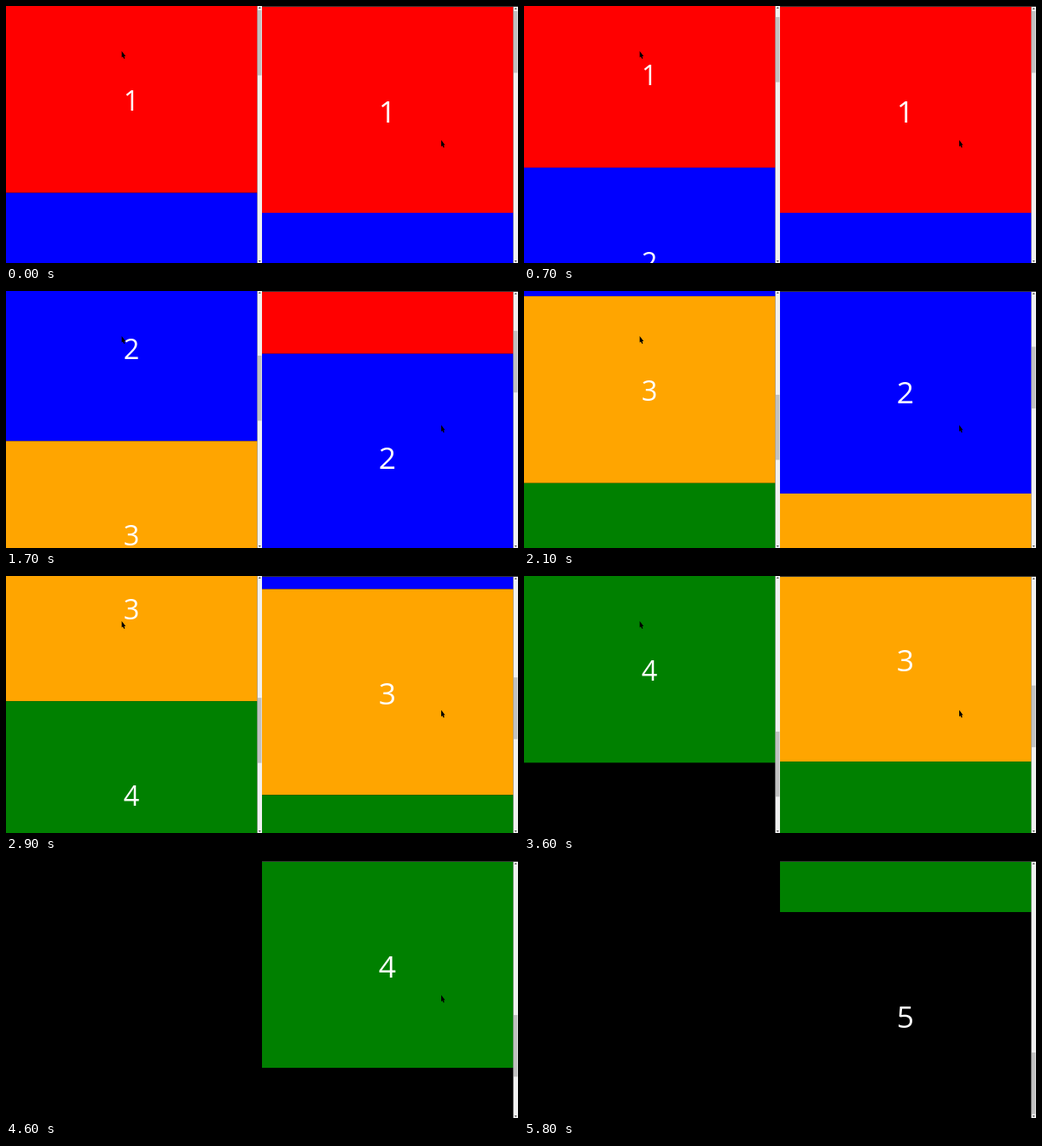
Write an HTML page that moves like this. It is 600 px wide and 302 px high and loops after 6.1 s.

```html
<!DOCTYPE html>
<html lang="en">
<head>
<meta charset="utf-8">
<title>Scroll snapping</title>
<style>
  html, body { margin: 0; width: 100%; height: 100%; overflow: hidden; background: #000; }
  svg { display: block; width: 600px; height: 302px; }
  text { font-family: "Open Sans", "Noto Sans", sans-serif; fill: #fff; text-anchor: middle; }
</style>
</head>
<body>
<svg id="stage" viewBox="0 0 600 302"></svg>
<script>
const LOOP = 6100, STEP = 100, LEFT_END = 4600;
const COLORS = ['#f00', '#00f', '#ffa500', '#008000', '#000'];
const stage = document.getElementById('stage');

function add(parent, tag, attrs, text) {
  const el = document.createElementNS('http://www.w3.org/2000/svg', tag);
  for (const key in attrs) el.setAttribute(key, attrs[key]);
  if (text) el.textContent = text;
  return parent.appendChild(el);
}

const rect = (parent, x, y, width, height, fill) =>
  add(parent, 'rect', { x, y, width, height, fill });

// A scrolling page with five numbered sections and its scrollbar.
function makePanel(o) {
  const root = add(stage, 'g', {});
  const view = add(root, 'svg', { x: o.x, y: o.top, width: 294.5, height: 302 - o.top });
  const page = add(view, 'g', {});
  COLORS.forEach((color, i) => {
    rect(page, 0, i * o.h, 295, o.h + (i === 4 ? 4 : 0), color);
    add(page, 'text', { x: 147, y: i * o.h + o.base, 'font-size': o.size }, String(i + 1));
  });
  const bar = o.x + 294.5;
  rect(root, bar, o.top, 5.5, 302 - o.top, '#f1f1f1');
  const thumb = rect(root, bar + 0.5, 0, 4.5, o.thumb, '#c1c1c1');
  const mid = bar + 2.8;
  add(root, 'path', {
    d: `M${mid - 1.5} ${o.top + 3}h3l-1.5-2zM${mid - 1.5} 299h3l-1.5 2z`, fill: '#555'
  });
  add(root, 'path', {
    transform: `translate(${o.cursor})`, d: 'M0 0V7.6L1.4 6.4 2.6 9 3.8 8.4 2.8 6H4.6Z', fill: '#000'
  });
  return {
    root,
    scroll(y) {
      page.setAttribute('transform', `translate(0 ${-y})`);
      thumb.setAttribute('y', o.thumbTop + y * o.ratio);
    }
  };
}

const LH = 219.6, RH = 242;
const left = makePanel({
  x: 0, top: 0, h: LH, base: 123, size: 32.5,
  thumb: 76.5, thumbTop: 5, ratio: 0.27, cursor: '135.6 53'
});
const right = makePanel({
  x: 300, top: 1, h: RH, base: 135.5, size: 35.5,
  thumb: 72.5, thumbTop: 6, ratio: 0.241, cursor: '510 157.6'
});
rect(stage, 300, 0, 300, 1, '#333');

function glide(t, start, length) {
  const p = Math.min(1, Math.max(0, (t - start) / length));
  return p * p * (3 - 2 * p);
}

// A short wheel move that springs back.
function nudge(t, start) {
  const p = (t - start) / 450;
  return p > 0 && p < 1 ? 32 * Math.sin(Math.PI * p) ** 2 : 0;
}

function leftScroll(t) {
  return LH * (glide(t, 550, 650) + glide(t, 1515, 650) + glide(t, 2650, 650))
    + (2 * LH - 302) * glide(t, 3870, 650);
}

function rightScroll(t) {
  const snap = (nudgeAt, glideAt) => Math.max(nudge(t, nudgeAt), RH * glide(t, glideAt, 660));
  return snap(975, 1280) + snap(2042, 2338) + snap(3445, 3738)
    + nudge(t, 4845) + (2 * RH - 301) * glide(t, 5450, 350);
}

function draw(now) {
  const t = Math.floor((now % LOOP) / STEP) * STEP;
  left.root.setAttribute('visibility', t < LEFT_END ? 'visible' : 'hidden');
  left.scroll(leftScroll(t));
  right.scroll(rightScroll(t));
}

let begin;
function tick(now) {
  if (begin === undefined) begin = now;
  draw(Math.max(0, now - begin));
  requestAnimationFrame(tick);
}
draw(0);
requestAnimationFrame(tick);
</script>
</body>
</html>
```
